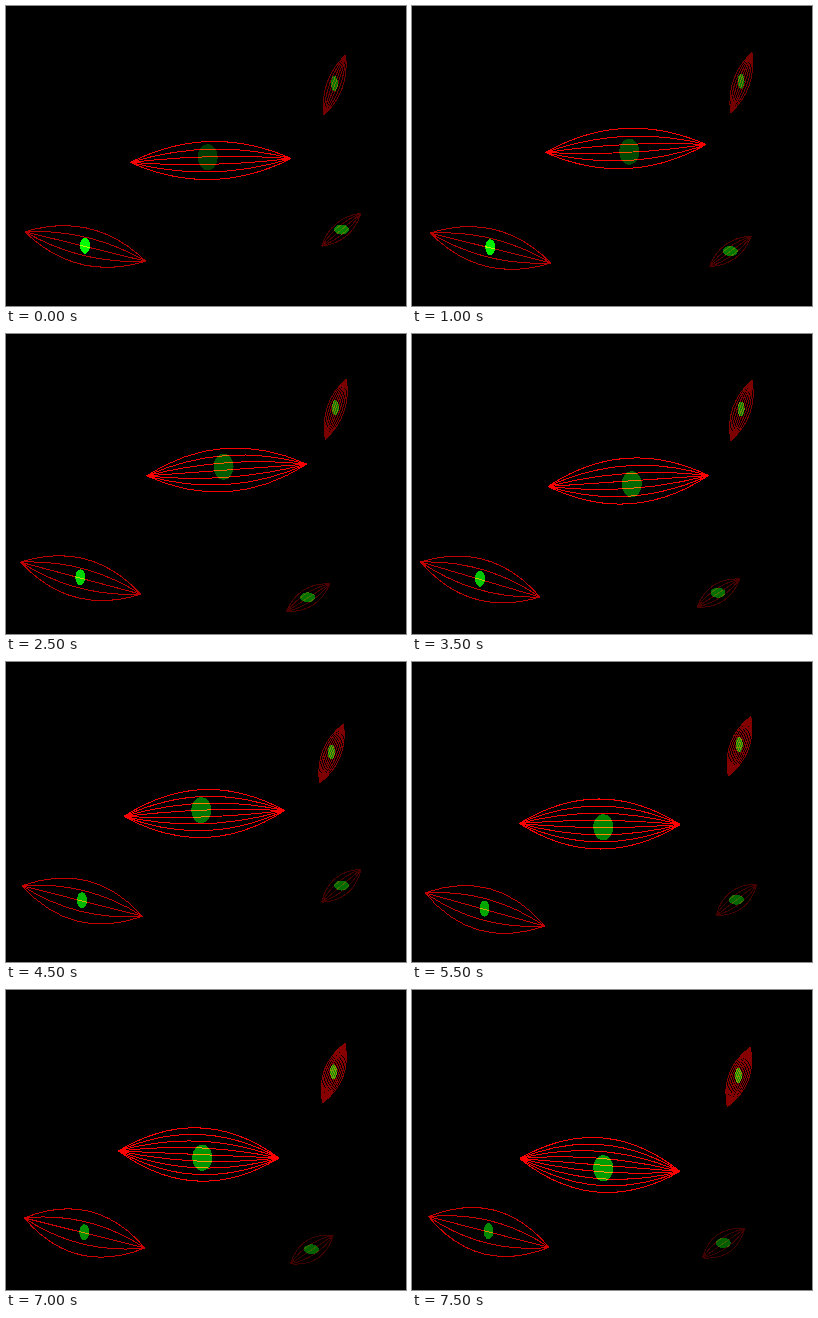
An HTML page for the animation above (8 s loop, 400x300 px).

```html
<!DOCTYPE html>
<html lang="en">
<head>
<meta charset="utf-8">
<title>Drifting cells</title>
<style>
  html, body { margin: 0; width: 100%; height: 100%; overflow: hidden; background: #000; }
  svg { display: block; width: 400px; height: 300px; background: #000; isolation: isolate; }
  path { fill: none; stroke-width: 1; }
  ellipse { mix-blend-mode: screen; }
</style>
</head>
<body>
<svg id="stage" viewBox="0 0 400 300" shape-rendering="crispEdges"></svg>
<script>
const STEP_MS = 500;
const STEPS = 16;
const DEG = Math.PI / 180;
const stage = document.getElementById('stage');

const mix = (a, b, k) => a + (b - a) * k;

// A few poses of the wandering cells; the steps between are interpolated.
// The right-hand cells only swing about the stage origin, by an angle in degrees.
const poses = [
  { step: 0, large: [204.5, 154, -1.4], left: [79, 240], upper: [0], lower: [0] },
  { step: 4, large: [222.5, 130, -4.3], left: [77.5, 243], upper: [-.8], lower: [7.7] },
  { step: 7, large: [216, 146.5, -3.9], left: [68, 245], upper: [-.45], lower: [6.4] },
  { step: 9, large: [198, 151, -2.1], left: [76, 238.5], upper: [2.2], lower: [0] },
  { step: 11, large: [187.5, 161.5, .4], left: [72.5, 247], upper: [.9], lower: [2.5] },
  { step: 13, large: [197.5, 153.5, .4], left: [80, 243.5], upper: [.05], lower: [7.7] },
  { step: 15, large: [187.5, 174.5, 4.6], left: [76.5, 241.5], upper: [1.4], lower: [5.3] }
];

function poseAt(name, step) {
  const next = Math.max(1, poses.findIndex(pose => pose.step >= step));
  const from = poses[next - 1], to = poses[next];
  const k = (step - from.step) / (to.step - from.step);
  return from[name].map((value, i) => mix(value, to[name][i], k));
}

function swing(x, y, angle, degrees) {
  const c = Math.cos(degrees * DEG), s = Math.sin(degrees * DEG);
  return { x: x * c - y * s, y: x * s + y * c, angle: angle + degrees };
}

// Each place() gives the centre, the tilt and the nucleus offset (dx, dy).
function placeLarge(step) {
  const [x, y, angle] = poseAt('large', step);
  const sway = -4.6 * Math.cos(Math.PI / 2 * (step - .5));
  return { x, y, angle, dx: sway, dy: sway };
}

function placeLeft(step) {
  const [x, y] = poseAt('left', step);
  return { x, y, angle: Math.atan2(y, x) / DEG - 58.1, dx: -.5, dy: -.8 };
}

function placeUpper(step) {
  const [turn] = poseAt('upper', step);
  return { ...swing(328.5, 78.5, 109.8, turn), dx: -.5, dy: -1.5 };
}

function placeLower(step) {
  const [turn] = poseAt('lower', step);
  const p = swing(335, 223.3, -40, turn);
  return { ...p, x: p.x - .3 * turn, y: p.y - .1 * turn, dx: -.1 * turn, dy: -.3 };
}

// Pairs are the values at the first and the last step.
const cells = [
  { place: placeLarge, length: 161, bulge: [19, 27.2], lines: [6, 9], red: [245, 255], green: [60, 158], rx: 10, ry: 13 },
  { place: placeLeft, length: 124.5, bulge: [18.3, 22.5], lines: [5, 5], red: [180, 205], green: [255, 135], rx: 5, ry: 8 },
  { place: placeUpper, length: 64, bulge: [8, 10], lines: [7, 12], red: [115, 135], green: [115, 150], rx: 3.5, ry: 7.5 },
  { place: placeLower, length: 51.5, bulge: [8, 10.5], lines: [5, 5], red: [80, 62], green: [125, 95], rx: 7.5, ry: 5 }
];

function add(tag) {
  return stage.appendChild(document.createElementNS('http://www.w3.org/2000/svg', tag));
}

function setAll(node, attributes) {
  for (const name in attributes) node.setAttribute(name, attributes[name]);
}

for (const cell of cells) {
  cell.fibres = add('path');
  cell.nucleus = add('ellipse');
  setAll(cell.nucleus, { rx: cell.rx, ry: cell.ry });
}

function spindle(length, bulge, count) {
  let d = '';
  for (let i = 0; i < count; i++) {
    const control = 2 * bulge * (2 * i / (count - 1) - 1);
    d += `M${-length / 2} 0Q0 ${control} ${length / 2} 0`;
  }
  return d;
}

function draw(step) {
  const age = step / (STEPS - 1);
  for (const cell of cells) {
    const { x, y, angle, dx, dy } = cell.place(step);
    const grown = ([first, last]) => mix(first, last, age);
    setAll(cell.fibres, {
      d: spindle(cell.length, grown(cell.bulge), Math.round(grown(cell.lines))),
      transform: `translate(${x + .3} ${y + .5}) rotate(${angle})`,
      stroke: `rgb(${Math.round(grown(cell.red))},0,0)`
    });
    setAll(cell.nucleus, {
      cx: x + dx + .5,
      cy: y + dy + .5,
      fill: `rgb(0,${Math.round(grown(cell.green))},0)`
    });
  }
}

const start = performance.now();
function tick() {
  draw(Math.floor((performance.now() - start) / STEP_MS) % STEPS);
  requestAnimationFrame(tick);
}
tick();
</script>
</body>
</html>
```
